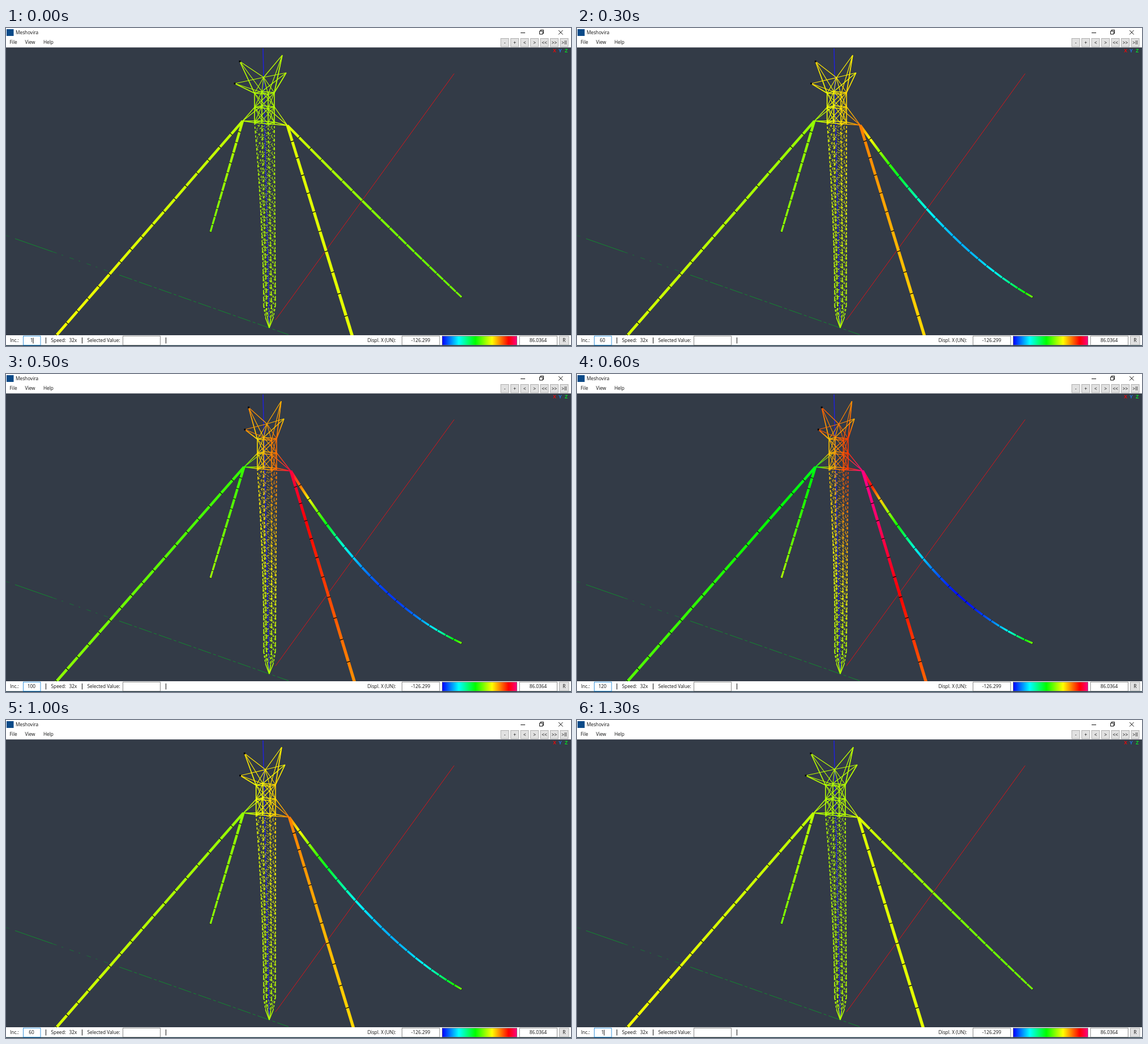
An HTML page with a canvas that plays this animation: 998x561 px, repeating every 1.4 s.

```html
<!DOCTYPE html>
<html lang="en">
<head>
<meta charset="utf-8">
<title>Mast viewer</title>
<style>
  html, body { margin: 0; width: 100%; height: 100%; overflow: hidden; background: #fff; }
  canvas, svg { position: absolute; left: 0; top: 0; }
  text { font: 8.3px "Open Sans", "Noto Sans", sans-serif; fill: #111; }
  .mid { text-anchor: middle; }
  .axis { font-weight: 600; font-size: 9px; }
  .box { fill: #fff; stroke: #8a8a8a; }
  .btn { fill: #e1e1e1; stroke: #adadad; }
  .line { fill: none; stroke: #111; }
</style>
</head>
<body>
<canvas id="view" width="998" height="561"></canvas>
<svg id="ui" width="998" height="561">
  <defs>
    <linearGradient id="scale">
      <stop offset="0" stop-color="#00f"/>
      <stop offset=".222" stop-color="#0ff"/>
      <stop offset=".444" stop-color="#0f0"/>
      <stop offset=".667" stop-color="#ff0"/>
      <stop offset=".889" stop-color="#f00"/>
      <stop offset="1" stop-color="#ff0080"/>
    </linearGradient>
  </defs>
  <rect width="998" height="34.3" fill="#fff"/>
  <rect y="542" width="998" height="19" fill="#fff"/>
  <rect y="559.6" width="998" height="1.4" fill="#17303f"/>
  <rect x="1" y="2" width="12.5" height="12" fill="#0b4a88"/>
  <text x="17" y="11.3">Meshovira</text>
  <text x="6.5" y="28.3">File</text>
  <text x="33.5" y="28.3">View</text>
  <text x="66" y="28.3">Help</text>
  <path class="line" d="M909 8.5h8M942.5 5.5h5.5v5.5h-5.5zM944 5v-1.5h5.5v6H948M976 4l7.5 7.5M983.5 4L976 11.5"/>
  <text class="mid axis" x="969" y="43" style="fill:#f00">X</text>
  <text class="mid axis" x="979" y="43" style="fill:#1e80ff">Y</text>
  <text class="mid axis" x="989.5" y="43" style="fill:#00f020">Z</text>
  <text x="7" y="554">Inc.:</text>
  <rect class="box" x="30.5" y="543.5" width="30.5" height="16" style="stroke:#3a96dd"/>
  <text class="mid" id="count" x="45" y="554"></text>
  <rect id="caret" y="546.5" width="1" height="10" fill="#111"/>
  <path class="line" d="M70.5 546v10.5M134.5 546v10.5M282.5 546v10.5"/>
  <text x="79.5" y="554">Speed:</text>
  <text x="111.5" y="554">32x</text>
  <text x="143.5" y="554">Selected Value:</text>
  <rect class="box" x="206.5" y="543.5" width="66" height="16"/>
  <text x="638.5" y="554">Displ. X (UN):</text>
  <rect class="box" x="699.5" y="543.5" width="66.5" height="16"/>
  <text class="mid" x="732.5" y="554">-126.299</text>
  <rect x="770.5" y="543.5" width="132" height="16" fill="url(#scale)" stroke="#555" stroke-width=".6"/>
  <rect class="box" x="907" y="543.5" width="66.5" height="16"/>
  <text class="mid" x="940" y="554">86.0364</text>
  <rect class="btn" x="977.5" y="543.5" width="16.5" height="15.5"/>
  <text class="mid" x="985.7" y="554">R</text>
</svg>
<script>
const ctx = view.getContext('2d');
const mix = (a, b, p) => a + (b - a) * p;
const color = hue => `hsl(${Math.max(-30, Math.min(240, hue))},100%,50%)`;

['-', '+', '<', '>', '<<', '>>', '>II'].forEach((label, i) => {
  const x = 874 + i * 17.5;
  const esc = label.replace(/</g, '&lt;').replace(/>/g, '&gt;');
  ui.insertAdjacentHTML('beforeend',
    `<rect class="btn" x="${x}" y="18.5" width="14" height="14.5"/>` +
    `<text class="mid" x="${x + 7}" y="28.5">${esc}</text>`);
});

function line(x1, y1, x2, y2, style, width = 1, dash = []) {
  ctx.strokeStyle = style;
  ctx.lineWidth = width;
  ctx.setLineDash(dash);
  ctx.beginPath();
  ctx.moveTo(x1, y1);
  ctx.lineTo(x2, y2);
  ctx.stroke();
}

// Nodes are [x, y, hue]
function strut(a, b, width = 1.2, dash) {
  const g = ctx.createLinearGradient(a[0], a[1], b[0], b[1]);
  g.addColorStop(0, color(a[2]));
  g.addColorStop(1, color(b[2]));
  line(a[0], a[1], b[0], b[1], g, width, dash);
}

function dot([x, y]) {
  ctx.fillStyle = '#000';
  ctx.fillRect(x - 1.5, y - 1.5, 3, 3);
}

// A guy rope of n links; ease models the perspective spacing
function cable(a, b, n, ease, w0, w1, sag = 0) {
  const nodes = [];
  for (let k = 0; k <= n; k++) {
    const q = k / n, p = (1 + ease) * q - ease * q * q, bow = 4 * q * (1 - q) * sag;
    nodes.push([
      mix(a[0], b[0], p) - 22.5 * bow,
      mix(a[1], b[1], p) + (27 - 11 * q) * bow,
      mix(a[2], b[2], q) + 185 * bow]);
  }
  const width = k => mix(w0, w1, k / n);
  for (let k = 0; k < n; k++) strut(nodes[k], nodes[k + 1], width(k));
  for (let k = 1; k <= n; k++) {
    const [x, y] = nodes[k], [px, py] = nodes[k - 1], w = width(k);
    const r = (w / 2 + 0.5) / Math.hypot(x - px, y - py);
    const nx = (py - y) * r, ny = (x - px) * r;
    line(x - nx, y - ny, x + nx, y + ny, '#000', w * 0.23);
  }
}

// Legs in order: left, back, right, front
const shift = [5, 3, 4, 6], side = [0, 0.2, 1, 0.8], lift = [0, -3, -1, 2];
function ring(y, move) {
  const t = Math.max(0, (y - 167) / 323), v = 1 - t;
  const xs = [455 - 16 * Math.max(0, v) ** 1.7, 452 + 8 * t, 474 + 2 * t, 463 + 6 * t];
  return xs.map((x, i) =>
    [x + shift[i] * v * move, y + lift[i], 78 - 26 * (1 + side[i]) * v * move]);
}

function panel(top, low, legWidth, braceWidth, dash) {
  for (let i = 0; i < 4; i++) {
    const j = (i + 1) % 4;
    strut(top[i], low[j], braceWidth, dash);
    strut(top[j], low[i], braceWidth, dash);
    strut(top[i], low[i], legWidth, dash);
  }
}

const hoop = (r, width) => r.forEach((a, i) => strut(a, r[(i + 1) % 4], width));

function mast(move) {
  const levels = 24, tip = [465, 529, 78], dash = [4, 3];
  let top = ring(167, move);
  for (let k = 1; k <= levels; k++) {
    const q = k / levels;
    const low = ring(167 + 323 * (1.15 * q - 0.15 * q * q), move);
    panel(top, low, 1.5, 0.9, dash);
    top = low;
  }
  const neck = top.map(([x, y, hue]) => [mix(x, tip[0], 0.35), mix(y, tip[1], 0.55), hue]);
  panel(top, neck, 1.5, 0.9, dash);
  neck.forEach(a => strut(a, tip, 1.5));

  const head = [115, 140, 167].map(y => ring(y, move));
  panel(head[0], head[1], 1.6, 1.1);
  panel(head[1], head[2], 1.6, 1.1);
  head.forEach(r => hoop(r, 1.5));
  return head;
}

// Crown tips: x, y, shift, hue drop, legs they are tied to
const tips = [
  [413, 59, 15.5, 44, [0, 1]],
  [404, 98, 18, 44, [0, 3]],
  [488, 48, -2, 34, [2, 3]],
  [495, 79, -4, 28, [2, 1]]];

function crown(base, move) {
  const apex = [455 + 6 * move, 87 + move, 76 - 38 * move];
  base.forEach(a => strut(apex, a, 1.1));
  for (const [x, y, dx, drop, ties] of tips) {
    const tip = [x + dx * move, y, 76 - drop * move];
    strut(tip, apex, 1.2);
    ties.forEach((leg, i) => strut(tip, base[leg], i ? 1.2 : 1.7));
    if (dx > 0) dot(tip);
  }
}

function draw(inc) {
  const u = inc / 100, move = u ** 1.2, heat = u ** 1.5, sag = u ** 0.6, cool = move ** 2;
  ctx.fillStyle = '#333b47';
  ctx.fillRect(0, 0, 998, 561);

  line(791.5, 80.5, 476, 515, '#d8141a', 1);
  line(0, 366, 6, 368, '#1a6038', 1);
  line(16, 371.6, 82, 394.6, '#12882f', 1);
  line(82, 394.6, 200, 435.7, '#1a7038', 1, [8, 9, 3, 12]);
  line(200, 435.7, 499, 541, '#12882f', 1, [24, 4, 5, 4]);
  line(454, 36, 465, 529, '#2020e0', 1.5);

  const left = [418 + 2.5 * move, 164, 76 + 32 * cool];
  const right = [497 + 6 * move, 172 - move, 68 - 83 * heat];
  cable(left, [361, 360, 92 - 10 * heat], 12, 0.2, 4.5, 3);
  cable(right, [805, 475, 92], 20, 0.364, 4.5, 3, sag);

  const head = mast(move);
  crown(head[0], move);
  const arm = (joint, legs) => legs.forEach(i => {
    strut(joint, head[1][i], 1.3);
    strut(joint, head[2][i], 1.3);
  });
  arm(left, [0, 1]);
  arm(right, [2, 3]);

  cable(left, [71, 563, 61 + 24 * cool], 18, 0.05, 4.5, 4.8);
  cable(right, [626 + 3.7 * move, 590, 66 - 27 * heat], 12, -0.214, 4.8, 5.5);

  count.textContent = inc;
  caret.setAttribute('x', inc > 1 ? 45 : 47.5);
  caret.style.display = inc < 60 ? '' : 'none';
}

let shown;
function tick() {
  const slot = Math.floor(performance.now() % 1400 / 100);
  const inc = Math.max(1, 20 * Math.min(slot, 6, 13 - slot));
  if (inc !== shown) draw(shown = inc);
  requestAnimationFrame(tick);
}
tick();
</script>
</body>
</html>
```
